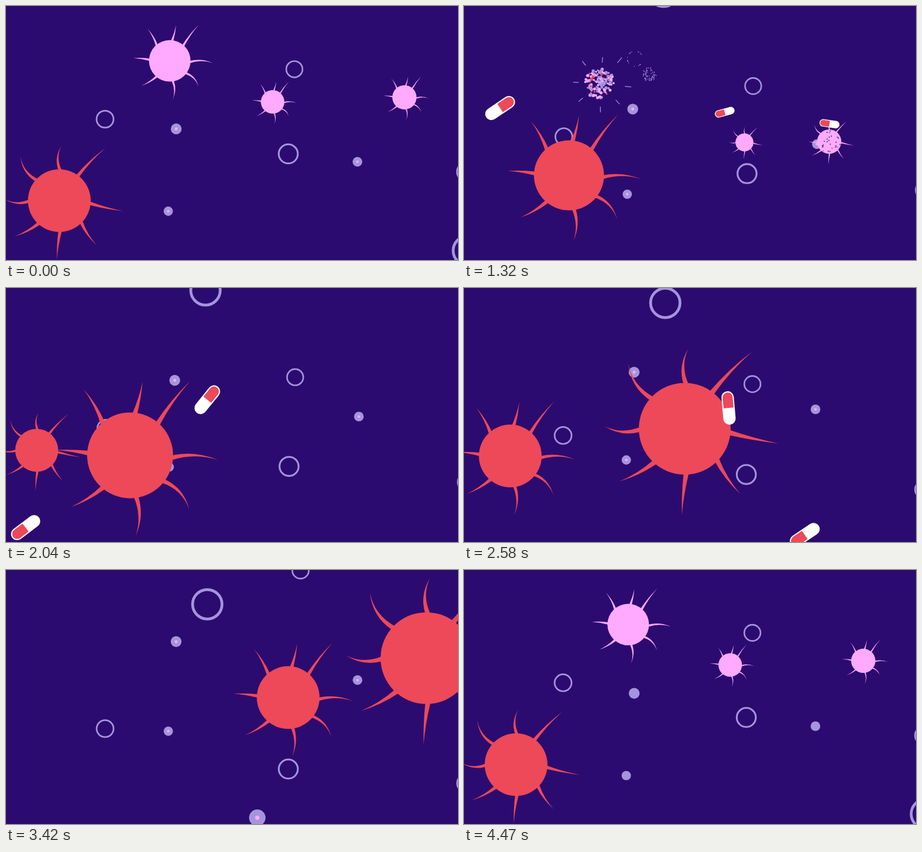
An HTML page with a canvas that plays this animation: 768x432 px, repeating every 4.5 s.

```html
<!DOCTYPE html>
<html lang="en">
<head>
<meta charset="utf-8">
<title>Microbes and capsules</title>
<style>
html, body { margin: 0; width: 100%; height: 100%; overflow: hidden; background: #2c0b70; }
canvas { display: block; }
</style>
</head>
<body>
<canvas id="stage" width="768" height="432"></canvas>
<script>
const ctx = document.getElementById('stage').getContext('2d');
const LOOP = 4500, CUT = 3930, SWAY = 840, TAU = Math.PI * 2, DEG = Math.PI / 180;
const BG = '#2c0b70', LILAC = '#a594dc', PINK = '#ffaaff', RED = '#ed4959', WHITE = '#fff';

// x and y at time 0, radius, sway; the larger ones drift faster
const rings = [
  [169, 192.5, 14.4, -.7], [490.7, 107.5, 13.8, -.7], [480.3, 251.5, 16.2, -.7], [782, 282, 15, -.7],
  [785.5, 416, 25, -.7], [340.5, -76, 25, 1.7], [500.5, -74.5, 14, 0]
];
const dots = [[287.9, 209, 9.2, 1.3], [276.6, 349, 7.9, -.9], [598.4, 265, 8.2, -1.3], [427, 554, 14, 0]];

// keys: time, x, y, radius
const reds = [
  { phase: 1, keys: [[0, 90.5, 331, 53.3], [780, 145, 333, 53.3], [1320, 178.3, 288, 59.5],
    [2040, 210.7, 284.7, 73], [2580, 374.7, 239.5, 78], [3420, 714, 150, 78]] },
  { phase: -1, keys: [[1500, -95, 262, 36.5], [2040, 52, 276, 36.5], [2580, 78.3, 285.7, 53.3], [3420, 479, 217, 53.3]] }
];
const pinks = [
  { melt: 1000, span: 450, keys: [[0, 278.3, 93.3, 35.3], [780, 259.5, 107.5, 35.3], [1320, 231, 132, 26]] },
  { melt: 1340, span: 260, keys: [[0, 453, 163, 20], [780, 471.5, 202, 19.7], [1320, 476.5, 232, 15.3]] },
  { melt: 1250, span: 350, keys: [[0, 677, 155.3, 20.6], [780, 639.5, 179, 20.6], [1320, 620.5, 230.5, 20.6]] }
];
// keys: time, x, y, direction of the red end
const pills = [
  { size: 1, melt: 1200, keys: [[300, 500, -80, 0], [780, 420, 54, -50], [1320, 303, 103, -132]] },
  { size: .6, melt: 1400, keys: [[780, 443.5, 75.5, 217], [1320, 443, 180.5, 165]] },
  { size: .6, melt: 1360, keys: [[780, 616.5, 18, 230], [1320, 621, 200, 188]] },
  { size: 1, melt: 2680, keys: [[1320, 61, 173.5, -34], [2040, 341.7, 190, -51], [2580, 449.3, 204, -95]] },
  { size: 1, melt: 2800, keys: [[2040, 32.3, 407.5, 143], [2580, 578, 420, 146]] }
];
// mean root angle, mean tip angle, length
const spikes = [
  [-51, -50, 2.23], [4, 6, 2.06], [41, 46, 1.86], [85, 89, 1.88],
  [131, 140, 1.83], [181, 183, 1.75], [226, 232, 1.88], [274, 276, 1.74]
];

const clamp = v => Math.max(0, Math.min(1, v));

function random(seed) {
  return () => (seed = (seed * 16807) % 2147483647) / 2147483647;
}

// Smooth curve through the keys, straight on beyond both ends
function sample(keys, t) {
  const last = keys.length - 1;
  const slope = (n, k) => {
    const a = keys[Math.max(0, n - 1)], b = keys[Math.min(last, n + 1)];
    return (b[k] - a[k]) / (b[0] - a[0]);
  };
  const end = t <= keys[0][0] ? 0 : t >= keys[last][0] ? last : -1;
  if (end >= 0) return [1, 2, 3].map(k => keys[end][k] + slope(end, k) * (t - keys[end][0]));
  const i = keys.findIndex(key => key[0] > t) - 1;
  const a = keys[i], b = keys[i + 1], d = b[0] - a[0], u = (t - a[0]) / d, v = 1 - u;
  return [1, 2, 3].map(k =>
    v * v * ((1 + 2 * u) * a[k] + u * d * slope(i, k)) +
    u * u * ((3 - 2 * u) * b[k] - v * d * slope(i + 1, k)));
}

function disc(x, y, r, color) {
  ctx.fillStyle = color;
  ctx.beginPath();
  ctx.arc(x, y, r, 0, TAU);
  ctx.fill();
}

// Calls paint with n seeded points spread over a disc
function scatter(n, x, y, r, rnd, paint) {
  for (let i = 0; i < n; i++) {
    const a = rnd() * TAU, d = Math.sqrt(rnd()) * r;
    paint(x + d * Math.cos(a), y + d * Math.sin(a), rnd());
  }
}

function drawSpike(r, [root, tip, len], i, sway) {
  const a = (root + 4 * sway * Math.cos((i - 2.5) * 50 * DEG)) * DEG;
  const b = (tip + 4 * sway * Math.cos((i - 2) * 36 * DEG)) * DEG;
  const bulge = .16 * sway * Math.sin(i * 45 * DEG) - .07;
  const x0 = r * .98 * Math.cos(a), y0 = r * .98 * Math.sin(a);
  const x1 = r * len * Math.cos(b), y1 = r * len * Math.sin(b);
  const dist = Math.hypot(x1 - x0, y1 - y0);
  const nx = -(y1 - y0) / dist * r, ny = (x1 - x0) / dist * r;
  const mid = side => [(x0 + x1) / 2 + nx * (bulge + side), (y0 + y1) / 2 + ny * (bulge + side)];
  ctx.beginPath();
  ctx.moveTo(x0 - nx * .055, y0 - ny * .055);
  ctx.quadraticCurveTo(...mid(-.024), x1, y1);
  ctx.quadraticCurveTo(...mid(.024), x0 + nx * .055, y0 + ny * .055);
  ctx.fill();
}

function drawMicrobe(x, y, r, color, sway) {
  ctx.save();
  ctx.translate(x, y);
  disc(0, 0, r, color);
  spikes.forEach((s, i) => drawSpike(r, s, i, sway));
  ctx.restore();
}

function drawGrains(x, y, r, k, rnd) {
  const fade = (1 - k) / .6;
  scatter(150, x, y, r, rnd, (gx, gy, pick) =>
    disc(gx, gy, r * fade * (.12 + .1 * rnd()), pick < .5 ? PINK : pick < .94 ? LILAC : RED));
  ctx.strokeStyle = LILAC;
  ctx.lineWidth = 2.6 * fade;
  ctx.beginPath();
  for (const [, tip, len] of spikes) {
    const cx = Math.cos(tip * DEG) * r * len, cy = Math.sin(tip * DEG) * r * len;
    ctx.moveTo(x + cx * .8, y + cy * .8);
    ctx.lineTo(x + cx, y + cy);
  }
  ctx.stroke();
}

function drawPink({ keys, melt, span }, t, sway, seed) {
  const k = clamp((t - melt) / span), rnd = random(seed);
  if (k === 1) return;
  const [x, y, r] = sample(keys, t);
  if (k > .4) return drawGrains(x, y, r, k, rnd);
  drawMicrobe(x, y, r, PINK, sway);
  scatter(k * 120, x, y, r * .95, rnd, (hx, hy, pick) =>
    disc(hx, hy, r * (.03 + k * .12), pick < .8 ? '#3d4a92' : RED));
}

function drawPill({ keys, size, melt }, t, seed) {
  const k = clamp((t - melt) / 200);
  if (k === 1) return;
  const [x, y, angle] = sample(keys, t);
  ctx.save();
  ctx.translate(x, y);
  ctx.rotate(angle * DEG);
  ctx.scale(size, size);
  if (k > 0) {
    // One half breaks up into dust, the other into a dotted rim
    const rnd = random(seed);
    scatter(60, -18, 0, 12, rnd, (dx, dy) => disc(dx, dy, 1.5 * (1 - k) + .2, LILAC));
    for (let i = 0; i < 20; i++) {
      const a = rnd() * TAU;
      disc(18 + 13 * Math.cos(a), 13 * Math.sin(a), .7, LILAC);
    }
  } else {
    ctx.fillStyle = WHITE;
    ctx.beginPath();
    ctx.roundRect(-28.5, -10.5, 57, 21, 10.5);
    ctx.fill();
    ctx.fillStyle = RED;
    ctx.beginPath();
    ctx.roundRect(0, -8.5, 26.5, 17, [0, 8.5, 8.5, 0]);
    ctx.fill();
  }
  ctx.restore();
}

function draw(now) {
  const time = now % LOOP, opening = time >= CUT;
  const t = opening ? time - LOOP : time;
  const sway = Math.cos(t / SWAY * TAU);

  ctx.fillStyle = BG;
  ctx.fillRect(0, 0, 768, 432);

  ctx.strokeStyle = LILAC;
  for (const [x, y, r, shift] of rings) {
    ctx.lineWidth = r * .19;
    ctx.beginPath();
    ctx.arc(x + shift * sway, y + r * t * .00157, r, 0, TAU);
    ctx.stroke();
  }
  for (const [x, y, r, shift] of dots) {
    const cx = x + shift * sway, cy = y - r * t * .00277;
    disc(cx, cy, r, LILAC);
    if (!opening) disc(cx, cy, r * .26, PINK);
  }

  pinks.forEach((p, i) => drawPink(p, t, -sway, 71 + i * 977));
  for (const { keys, phase } of reds) drawMicrobe(...sample(keys, t), RED, phase * sway);
  pills.forEach((p, i) => drawPill(p, t, 503 + i * 311));
}

const start = performance.now();
function tick() {
  draw(performance.now() - start);
  requestAnimationFrame(tick);
}
tick();
</script>
</body>
</html>
```
